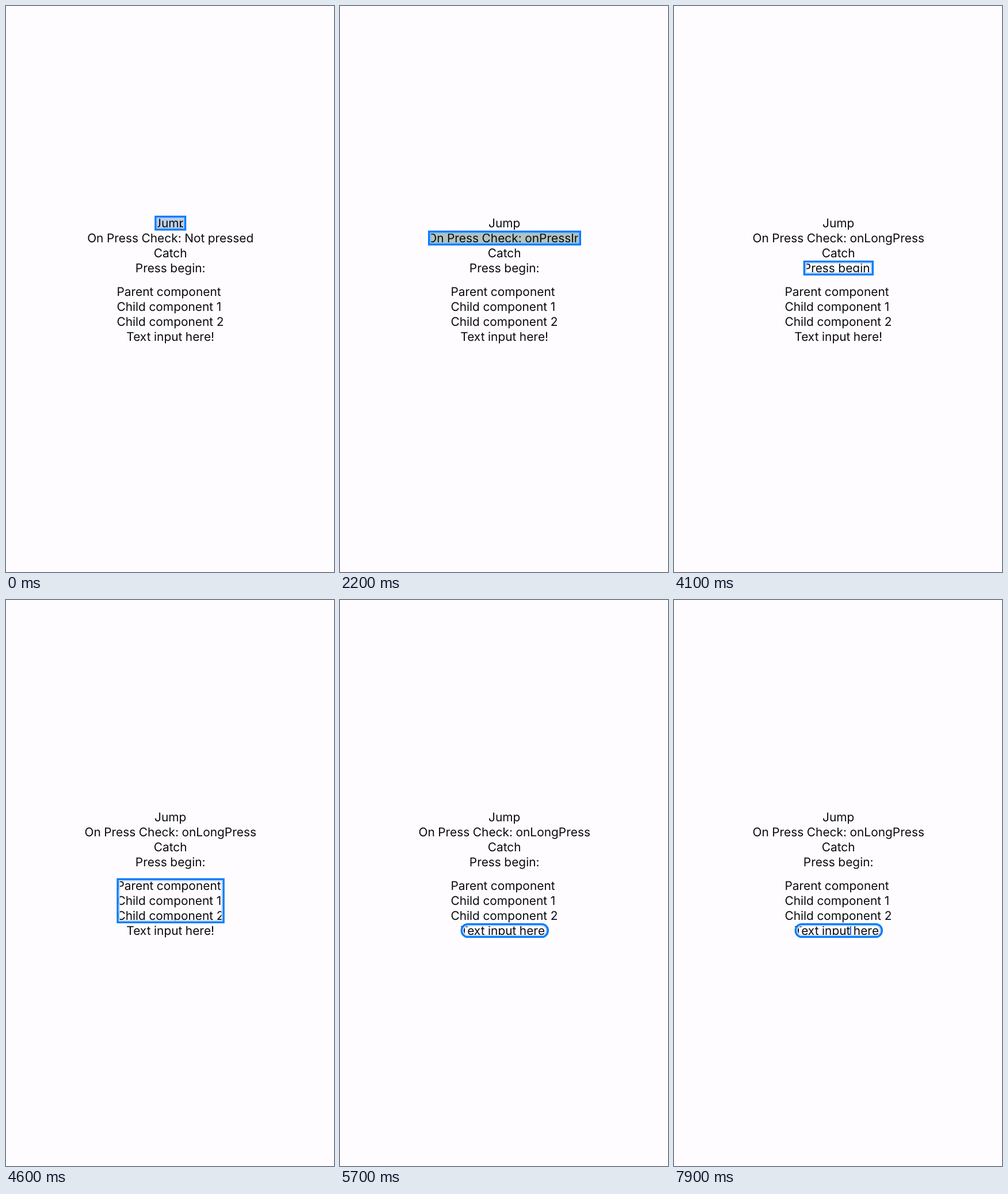
Recreate the animation shown at these times as an HTML page. Size 570 px wide and 982 px high, loop 8000 ms.

```html
<!DOCTYPE html>
<html lang="en">
<head>
<meta charset="utf-8">
<title>Keyboard focus</title>
<style>
  html, body { margin: 0; width: 100%; height: 100%; overflow: hidden; background: #fefcff; }
  svg { display: block; width: 570px; height: 982px; }
  text {
    font: 20.9px Inter, Roboto, sans-serif;
    font-optical-sizing: none;
    text-rendering: geometricPrecision;
    word-spacing: -.4px;
    fill: #0b0b0d;
  }
  .mid { text-anchor: middle; }
</style>
</head>
<body>
<svg viewBox="0 0 570 982">
  <rect id="tint"/>
  <g id="lines"></g>
  <rect id="caret" x="305.6" y="564" width="2.4" height="19" rx="1" fill="#2f7bf0"/>
  <rect id="halo" fill="none" stroke-width="2.4"/>
  <rect id="ring" fill="none" stroke="#067bfb" stroke-width="3.2"/>
</svg>
<script>
const LOOP = 8000;
const byId = id => document.getElementById(id);
const [tint, halo, ring, caret] = ['tint', 'halo', 'ring', 'caret'].map(byId);

function set(el, attrs) {
  for (const name in attrs) el.setAttribute(name, attrs[name]);
}

function addLine(str, y, x) {
  const el = document.createElementNS('http://www.w3.org/2000/svg', 'text');
  set(el, x ? { x, y } : { x: 285.7, y, class: 'mid' });
  el.textContent = str;
  byId('lines').append(el);
  return el;
}

addLine('Jump', 384);
const check = addLine('', 410);
addLine('Catch', 436);
addLine('Press begin:', 462);
addLine('Parent component', 503, 192.4);
addLine('Child component 1', 529, 192.4);
addLine('Child component 2', 555, 192.4);
addLine('Text input here!', 581);

// x, y, width, height, corner radius
const boxes = {
  jump: [258.2, 363.8, 55, 25.8, 0],
  idle: [140.8, 389.7, 291, 25.8, 0],
  pressed: [153, 389.7, 266, 25.8, 0],
  held: [137, 389.7, 299, 25.8, 0],
  catcher: [256.8, 415.7, 58.8, 25.8, 0],
  begin: [224.7, 441.7, 122.3, 25.8, 0],
  parent: [192.4, 482.7, 187.4, 78.2, 0],
  child: [192.9, 508.7, 186.6, 25.8, 0],
  input: [209.6, 560.7, 153.4, 25.6, 12.5]
};

// start, box, tint colour, halo colour, tint levels as [time, level]
const steps = [
  [0, 'jump', '#bccfea', '#a9cbf5', [[0, 1]]],
  [500, 'catcher', '#cad6e6', '#b3d2f7', [[0, 1]]],
  [1200, 'idle', '#fefcff', '#bfdafa', [[0, 0]]],
  [1900, 'pressed', '#b2c3bf', '#8bbdf5', [[1900, 0], [2100, 1]]],
  [2500, 'held', '#b2c3bf', '#9dc7f7', [[2700, 1], [3100, 0]]],
  [3400, 'catcher', '#fefcff', '#bfdafa', [[0, 0]]],
  [3900, 'begin', '#fefcff', '#bfdafa', [[0, 0]]],
  [4300, 'parent', '#dadff5', '#bfdafa', [[4600, 0], [4700, 1], [5000, 0]]],
  [5200, 'child', '#dadff5', '#b0d0f8', [[5250, 1], [5400, 0]]],
  [5700, 'input', '#fefcff', '#bfdafa', [[0, 0]]]
];

const labels = [[0, 'Not pressed'], [1900, 'onPressIn'], [2500, 'onLongPress']];

const blink = [
  [6200, 0], [6250, 1], [6500, 1], [6750, 0], [7050, 0], [7300, 1],
  [7400, 1], [7550, 0], [7700, 0], [7880, 1]
];

const latest = (list, t) => list.filter(item => item[0] <= t).pop();

function level(keys, t) {
  const i = keys.findIndex(k => k[0] > t);
  if (i < 0) return keys[keys.length - 1][1];
  if (i === 0) return keys[0][1];
  const [t0, a] = keys[i - 1], [t1, b] = keys[i];
  return a + (b - a) * (t - t0) / (t1 - t0);
}

function place(el, [x, y, w, h, r], inset) {
  set(el, {
    x: x + inset, y: y + inset,
    width: w - 2 * inset, height: h - 2 * inset,
    rx: Math.max(0, r - inset)
  });
}

function draw(t) {
  const [, name, fill, glow, keys] = latest(steps, t);
  const box = boxes[name];
  place(tint, box, 1);
  place(halo, box, 4.2);
  place(ring, box, 1.6);
  set(tint, { fill, opacity: level(keys, t) });
  set(halo, { stroke: glow });
  set(caret, { opacity: level(blink, t) });
  const label = 'On Press Check: ' + latest(labels, t)[1];
  if (check.textContent !== label) check.textContent = label;
}

const start = performance.now();
function tick() {
  draw((performance.now() - start) % LOOP);
  requestAnimationFrame(tick);
}
tick();
</script>
</body>
</html>
```
